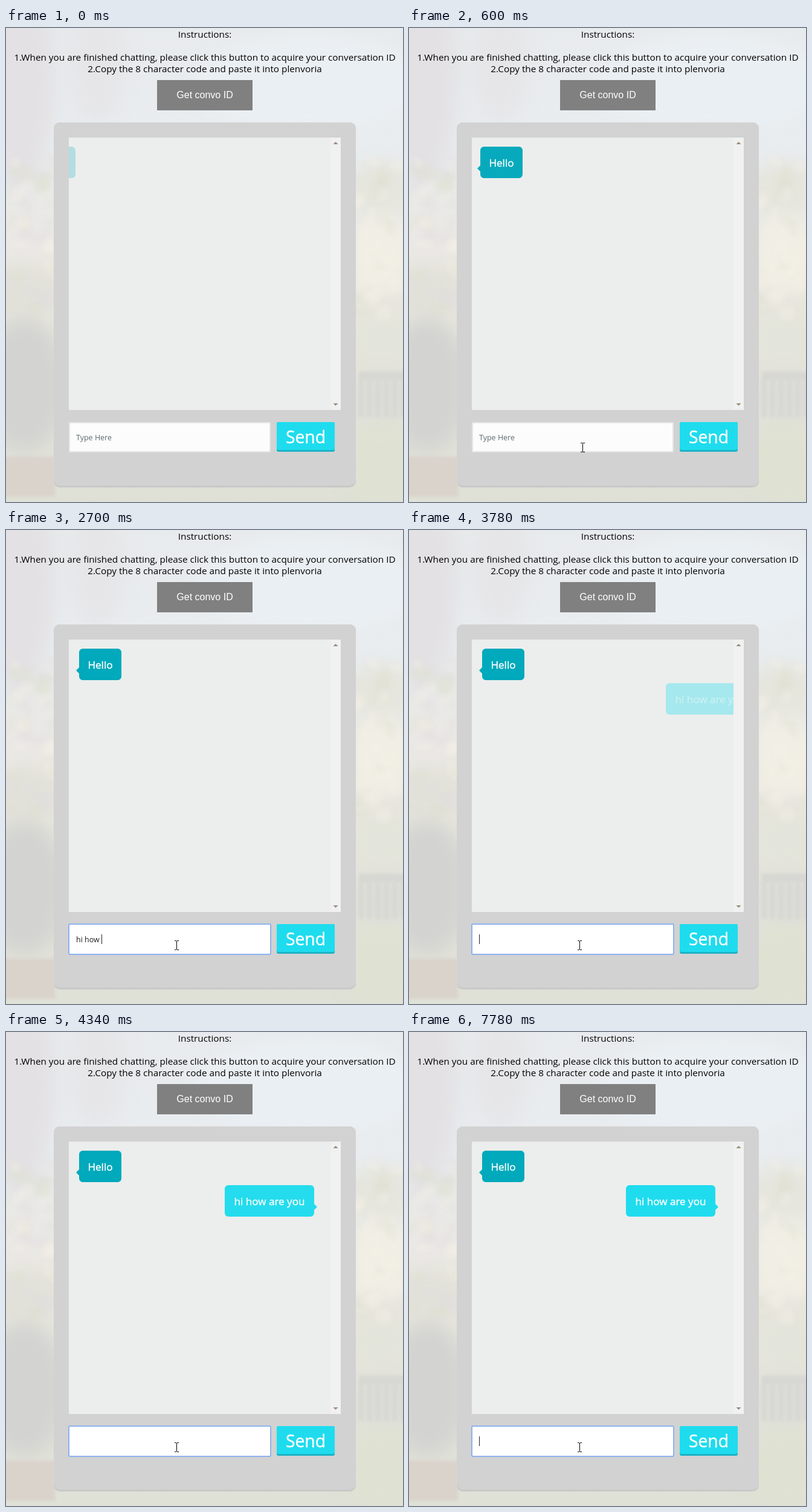
These frames come from a looping animation (657x783 px, 8 s). An HTML page with a canvas:

```html
<!DOCTYPE html>
<html lang="en">
<head>
<meta charset="utf-8">
<title>Chat</title>
<style>
html, body { margin: 0; width: 100%; height: 100%; overflow: hidden; }
canvas { display: block; }
</style>
</head>
<body>
<canvas id="stage" width="657" height="783"></canvas>
<script>
const W = 657, H = 783, LOOP = 8000;
const SANS = '"Open Sans", "Noto Sans", sans-serif';
const stage = document.getElementById('stage').getContext('2d');
const scene = document.createElement('canvas');
scene.width = W;
scene.height = H;

const MESSAGE = 'hi how are you';
const FOCUS = 930, SEND = 3580;
const KEY_TIMES = [1760, 1910, 2050, 2130, 2320, 2510, 2700, 2790, 2880, 3020, 3110, 3250, 3345, 3440];
const CARET_TOGGLES = [930, 1440, 1760, 4120, 4630, 5190, 5700, 6210, 6760, 7270, 7780];

const countPassed = (times, t) => times.filter(k => k <= t).length;

function box(c, x, y, w, h, r, fill) {
  c.fillStyle = fill;
  c.beginPath();
  c.roundRect(x, y, w, h, r);
  c.fill();
}

function frame(c, x, y, w, h, color) {
  c.strokeStyle = color;
  c.lineWidth = 2;
  c.beginPath();
  c.roundRect(x, y, w, h, 2);
  c.stroke();
}

function text(c, str, x, y, size, color, align = 'left', family = SANS) {
  c.font = `${size}px ${family}`;
  c.fillStyle = color;
  c.textAlign = align;
  c.fillText(str, x, y);
}

// white label, slightly heavier than regular
function label(c, str, x, y, size) {
  text(c, str, x, y, size, '#fff', 'center');
  c.strokeStyle = '#fff';
  c.lineWidth = .4;
  c.strokeText(str, x, y);
}

function triangle(c, x, y, dy) {
  c.beginPath();
  c.moveTo(x - 4, y);
  c.lineTo(x + 4, y);
  c.lineTo(x, y + dy);
  c.fill();
}

// CSS "ease": cubic-bezier(.25, .1, .25, 1)
function ease(x) {
  if (x <= 0) return 0;
  if (x >= 1) return 1;
  let lo = 0, hi = 1, s;
  for (let i = 0; i < 24; i++) {
    s = (lo + hi) / 2;
    if (.75 * s - .75 * s * s + s ** 3 < x) lo = s; else hi = s;
  }
  return .3 * (1 - s) ** 2 * s + 3 * (1 - s) * s * s + s ** 3;
}

function paintGarden(c) {
  const sky = c.createLinearGradient(0, 0, 0, H);
  sky.addColorStop(0, '#e8ebed');
  sky.addColorStop(.25, '#e9edf0');
  sky.addColorStop(.5, '#e9e8e0');
  sky.addColorStop(1, '#dfe0d6');
  c.fillStyle = sky;
  c.fillRect(0, 0, W, H);

  const patches = [
    [20, 90, 60, 180, '#e3e1e3'], [150, 60, 50, 100, '#e6e6e8'],
    [500, 90, 190, 80, '#eaeff3'], [30, 340, 50, 60, '#eae8e5'],
    [30, 435, 60, 45, '#e2e1d9'], [30, 590, 70, 110, '#d3d3d1'],
    [620, 265, 50, 45, '#e5e5dc'], [620, 375, 50, 65, '#f1efe5'],
    [625, 510, 50, 40, '#e3e4da'], [625, 610, 50, 40, '#dcdcd8'],
    [625, 720, 70, 65, '#dfe2d2']
  ];
  c.filter = 'blur(14px)';
  for (const [x, y, rx, ry, color] of patches) {
    c.fillStyle = color;
    c.beginPath();
    c.ellipse(x, y, rx, ry, 0, 0, 7);
    c.fill();
  }

  let seed = 7;
  const random = () => (seed = seed * 16807 % 2147483647) / 2147483647;
  c.filter = 'blur(4px)';
  c.globalAlpha = .4;
  for (let i = 0; i < 70; i++) {
    const right = i % 2;
    const x = right ? 575 + random() * 82 : random() * 80;
    const y = 215 + random() * 265;
    c.fillStyle = ['#dfe1cf', '#f4f1e6', '#e2dee2'][Math.floor(random() * (right ? 2 : 3))];
    c.beginPath();
    c.ellipse(x, y, 4 + random() * 10, 5 + random() * 12, random() * 3, 0, 7);
    c.fill();
  }
  c.globalAlpha = 1;
  c.filter = 'blur(2px)';
  c.fillStyle = '#d7d7d3';
  c.fillRect(584, 568, 80, 14);
  for (let x = 584; x < W; x += 14) c.fillRect(x, 580, 7, 62);
  c.fillStyle = '#dad3cc';
  c.fillRect(-5, 708, 86, 66);
  c.filter = 'none';
}

function paintScene() {
  const c = scene.getContext('2d');
  paintGarden(c);

  text(c, 'Instructions:', 329, 16, 15.3, '#000', 'center');
  text(c, '1.When you are finished chatting, please click this button to acquire your conversation ID',
    329, 54, 15.3, '#000', 'center');
  text(c, '2.Copy the 8 character code and paste it into plenvoria', 329, 73, 15.3, '#000', 'center');
  c.fillStyle = '#808080';
  c.fillRect(250, 86, 158, 50);
  text(c, 'Get convo ID', 329, 116, 16, '#fff', 'center', '"Liberation Sans", Arial, sans-serif');

  box(c, 79, 156, 500, 603, 10, '#c9c9c9');
  box(c, 79, 156, 500, 600, 10, '#d2d2d2');
  c.fillStyle = '#eceeed';
  c.fillRect(104, 181, 450, 450);
  c.fillStyle = '#f0f1f0';
  c.fillRect(537, 181, 17, 450);
  c.fillStyle = '#9c8b7c';
  triangle(c, 545.5, 192, -4);
  triangle(c, 545.5, 620, 4);

  box(c, 448, 651, 96, 49, 3, '#1bb2c6');
  box(c, 448, 651, 96, 46, 3, '#1edcee');
  label(c, 'Send', 496, 686, 28.3);
}

// side: -1 puts the tail on the left, 1 on the right
function bubble(str, x, y, w, side, color, progress) {
  const c = stage;
  const left = Math.round(x + side * 100 * (1 - progress));
  const edge = side < 0 ? left : left + w;
  c.globalAlpha = progress;
  c.fillStyle = color;
  c.beginPath();
  c.roundRect(left, y, w, 52, 6);
  // wound the same way as the body so that both fill as one shape
  c.moveTo(edge + side * 5, y + 36);
  c.lineTo(edge, y + 36 + side * 5);
  c.lineTo(edge, y + 36 - side * 5);
  c.fill();
  label(c, str, left + w / 2, y + 33, 17.1);
  c.globalAlpha = 1;
}

function drawField(t) {
  const c = stage;
  if (t < FOCUS) {
    box(c, 104, 651, 334, 50, 3, '#fcfcfc');
    frame(c, 105, 652, 332, 48, '#e5e5e5');
    text(c, 'Type Here', 116, 681, 12.5, '#5f6c70');
    return;
  }
  box(c, 104, 651, 334, 50, 2, '#fff');
  frame(c, 104, 651, 334, 50, '#8fb2ee');
  const typed = t < SEND ? MESSAGE.slice(0, countPassed(KEY_TIMES, t)) : '';
  text(c, typed, 116, 681, 12.5, '#222');
  if (countPassed(CARET_TOGGLES, t) % 2) {
    c.fillStyle = '#222';
    c.fillRect(116 + Math.floor(c.measureText(typed).width), 668, 1, 16);
  }
}

function drawPointer(t) {
  if (t < 150) return;
  const c = stage;
  const rest = 1 - Math.min(1, (t - 150) / 640);
  const x = Math.round(282 + 185 * rest ** 3), y = Math.round(686 + 98 * rest ** 2.2);
  c.save();
  c.translate(x, y);
  if (y > 701) {
    const arrow = new Path2D('M.5 .5V16.5L4.2 13L6.8 18.5L9 17.5L6.5 12H11.5Z');
    c.fillStyle = '#fff';
    c.fill(arrow);
    c.strokeStyle = '#000';
    c.lineWidth = 1;
    c.stroke(arrow);
  } else {
    c.fillStyle = '#000';
    c.fillRect(0, -7, 1, 14);
    for (const end of [-8, 7]) {
      c.fillRect(-3, end, 3, 1);
      c.fillRect(1, end, 3, 1);
    }
  }
  c.restore();
}

function draw(t) {
  stage.drawImage(scene, 0, 0);
  stage.save();
  stage.beginPath();
  stage.rect(104, 181, 433, 450);
  stage.clip();
  bubble('Hello', 121, 196, 70, -1, '#00a9bb', ease((t + 175) / 1000));
  if (t >= SEND) bubble(MESSAGE, 359, 253, 148, 1, '#1edcee', ease((t - 3560) / 1000));
  stage.restore();
  drawField(t);
  drawPointer(t);
}

paintScene();
const start = performance.now();
function tick() {
  draw((performance.now() - start) % LOOP);
  requestAnimationFrame(tick);
}
tick();
</script>
</body>
</html>
```
